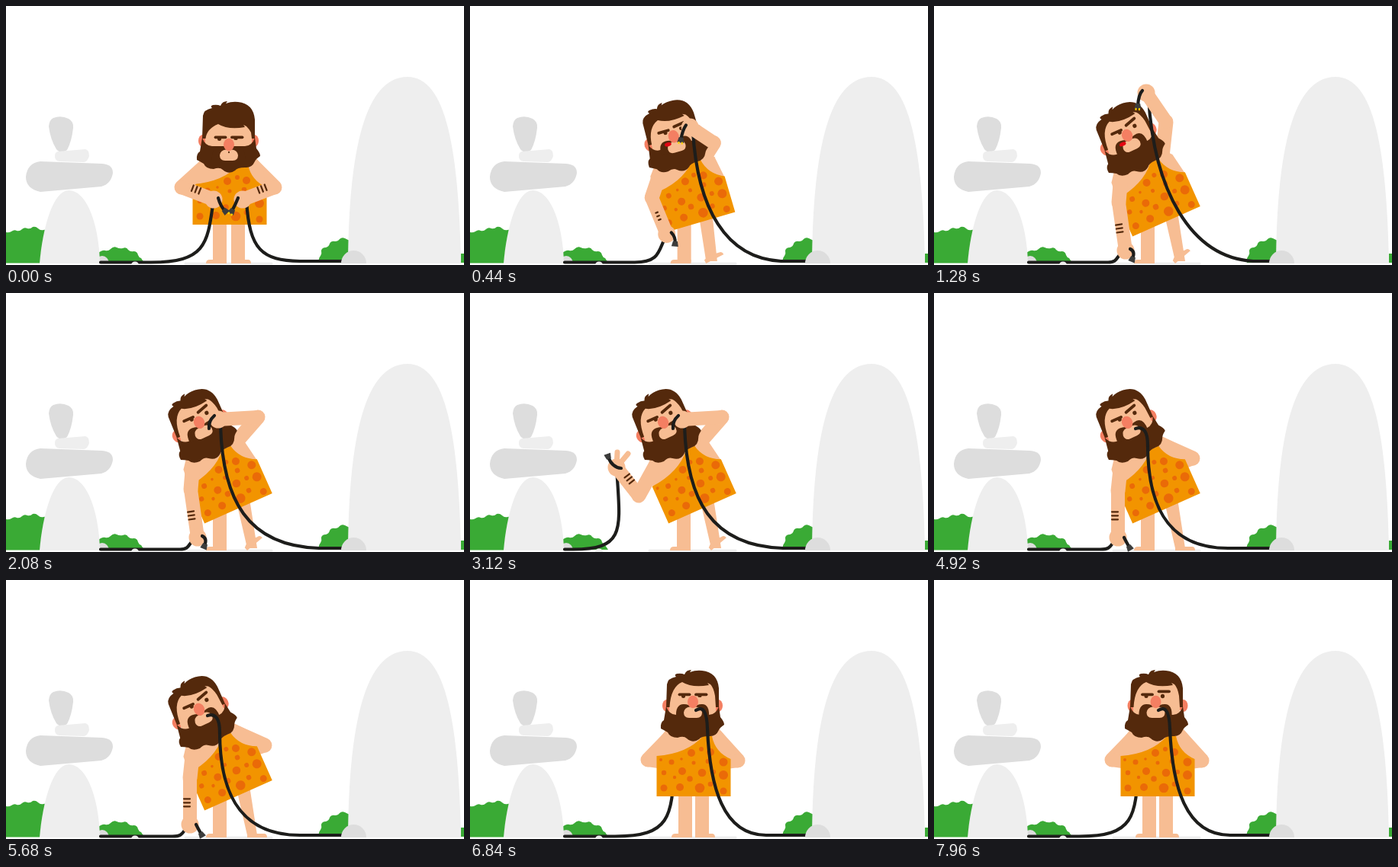
Animation, 600 px wide and 340 px high, one loop 8 s. Source, as an HTML page with a canvas:

```html
<!DOCTYPE html>
<html lang="en">
<head>
<meta charset="utf-8">
<title>Caveman with cables</title>
<style>
  html, body { margin: 0; width: 100%; height: 100%; overflow: hidden; background: #fff; }
  canvas { display: block; width: 600px; height: 340px; }
</style>
</head>
<body>
<canvas id="stage"></canvas>
<script>
const LOOP = 8000, LEAN_ANGLE = -24 * Math.PI / 180, HIP = [292.5, 284];
const SKIN = '#f7bd93', HAIR = '#54290c', CABLE = '#1d1d1b', PALE = '#eee', STONE = '#ddd',
      GREEN = '#3aaa35', ROSE = '#f47f62', TUNIC = '#f29400', SPOT = '#ea6a08', PLUG = '#3c3c3b';

const canvas = document.getElementById('stage');
const ctx = canvas.getContext('2d');
const ratio = window.devicePixelRatio || 1;
canvas.width = 600 * ratio;
canvas.height = 340 * ratio;

// ---------- drawing helpers ----------
function shape(path, color) {
  ctx.fillStyle = color;
  ctx.fill(typeof path === 'string' ? new Path2D(path) : path);
}
function stroke(path, width, color, cap = 'round') {
  ctx.lineWidth = width;
  ctx.strokeStyle = color;
  ctx.lineCap = cap;
  ctx.lineJoin = 'round';
  ctx.stroke(new Path2D(path));
}
function oval(x, y, rx, ry, color) {
  ctx.fillStyle = color;
  ctx.beginPath();
  ctx.ellipse(x, y, rx, ry, 0, 0, 7);
  ctx.fill();
}
const limb = (a, b, width) => stroke(`M${a}L${b}`, width, SKIN);
function grouped(draw) {
  ctx.save();
  draw();
  ctx.restore();
}

// ---------- poses ----------
const ground = 336.5;
const front = {
  lean: 0, look: 1, toe: 0, drop: 3, brow: 0, gaze: 0, open: 0, mouth: 0, shift: 0,
  side: -1, band: 0.42, bandR: 1, plugR: 1, fingers: 0,
  elbowL: [230, 238], handL: [272, 254], elbowR: [352, 238], handR: [310, 254],
  cableL: [264, 310, 264, ground, 190, ground],
  cableR: [315, 256, 319, 320, 335, 334, 385, 335],
  tailL: [287, 269, 281, 263, 278, 252],
  tailR: [296, 269, 300, 262, 304, 252]
};
const raised = {
  ...front, lean: 1, look: 0, toe: 1, drop: 0, brow: 1, gaze: 5, open: 1, mouth: 1,
  side: 1, band: 0.53, bandR: 0,
  elbowL: [242, 258], handL: [251, 321], elbowR: [304, 152], handR: [278, 114],
  cableL: [238, 326, 243, ground, 228, ground],
  cableR: [281, 120, 288, 240, 335, 330, 418, 335],
  tailL: [260, 332, 264, 322, 257, 319],
  tailR: [267, 131, 268, 116, 273, 111]
};
const biting = {
  ...raised, mouth: 0, plugR: 0, elbowR: [330, 163], handR: [278, 166],
  cableR: [281, 175, 284, 270, 315, 332, 410, 335],
  tailR: [266, 178, 265, 168, 273, 161]
};
const lifting = {
  ...biting, fingers: 1, elbowL: [221, 266], handL: [192, 229],
  cableL: [197, 310, 205, ground, 135, ground],
  tailL: [181, 215, 186, 229, 198, 230]
};
const hook = {
  cableR: [280, 200, 280, 270, 300, 335, 385, 335],
  tailR: [264, 178, 280, 173, 280, 200]
};
const swinging = {
  ...biting, ...hook, toe: 0.4, elbowL: [228, 262], handL: [224, 290],
  cableL: [222, 318, 222, ground, 190, ground],
  tailL: [224, 303, 232, 294, 231, 288],
  elbowR: [338, 160], handR: [362, 121]
};
const pointing = {
  ...biting, ...hook, toe: 0, bandR: 1,
  elbowL: [244, 262], handL: [256, 320], elbowR: [345, 196], handR: [388, 222],
  cableL: [243, 328, 250, ground, 232, ground],
  tailL: [261, 334, 267, 322, 262, 319]
};
const resting = {
  ...pointing, bandR: 0, elbowL: [241, 260], handL: [241, 321], elbowR: [339, 217], handR: [315, 226],
  cableL: [230, 330, 234, ground, 218, ground],
  tailL: [256, 334, 252, 327, 249, 321]
};
const standing = {
  ...front, look: 0, drop: 0, plugR: 0, bandR: 0,
  elbowL: [233, 236], handL: [268, 241], elbowR: [351, 237], handR: [320, 241],
  tailL: [280, 260, 278, 256, 274, 250],
  cableR: [311, 195, 314, 270, 331, 335, 388, 335],
  tailR: [296, 171, 310, 162, 311, 195]
};
const glancing = {
  ...standing, brow: 0.8, open: 1, shift: -1.5,
  cableR: [309, 195, 312, 270, 329, 335, 388, 335],
  tailR: [294, 171, 308, 162, 309, 195]
};

const timeline = [
  [0, front], [100, front], [700, raised], [1400, raised], [1780, biting], [2500, biting],
  [2880, lifting], [3360, lifting], [3680, swinging], [4080, pointing], [4280, pointing],
  [4800, resting], [5900, resting], [6400, standing], [7500, standing], [7660, glancing], [LOOP, glancing]
];

const blend = (a, b, k) => Array.isArray(a) ? a.map((v, i) => blend(v, b[i], k)) : a + (b - a) * k;
const ease = k => k < 0.5 ? 4 * k ** 3 : 1 - (2 - 2 * k) ** 3 / 2;

function poseAt(t) {
  const i = timeline.findIndex(key => key[0] > t);
  const [t0, a] = timeline[i - 1], [t1, b] = timeline[i];
  const k = ease((t - t0) / (t1 - t0)), pose = {};
  for (const name in a) pose[name] = blend(a[name], b[name], k);
  return pose;
}

// ---------- scenery ----------
function scenery() {
  shape(`M0 297Q4 298 7 296Q11 293 14 295Q18 296 21 293Q24 290 28 292Q32 293 35 290Q39 289 42 292
    Q45 295 49 294Q54 293 58 299V337.5H0Z`, GREEN);
  shape(`M120 325Q126 320 130 321Q134 322 137 319Q141 315 145 317Q149 319 153 318Q158 316 160 320
    Q163 323 167 322Q172 322 173 327Q174 330 177 331L181 337H120Z`, GREEN);
  shape(`M410 337Q409 331 412 328Q414 325 413 321Q414 317 419 317Q423 316 424 312Q426 308 431 309
    Q435 309 437 306Q440 303 444 305L452 309V337Z`, GREEN);
  shape('M596 325H600V337H596Z', GREEN);
  shape('M448 338C449 190 470 93 526 93C577 93 593 190 596 338Z', PALE);
  shape('M117 338A9 10 0 0 1 135 338Z', STONE);
  shape('M44 338C48 290 62 242 82 242C107 242 122 290 123 338Z', PALE);
  shape('M62 147Q72 143 82 148Q89 152 88 160Q86 178 80 189Q72 195 66 188Q58 175 56 158Q57 149 62 147Z', STONE);
  shape('M68 191L104 188Q109 189 109 197Q107 204 102 205L70 204Q64 203 64 197Q64 192 68 191Z', PALE);
  shape('M45 204L126 207Q140 208 140 219Q138 233 125 237L45 244Q26 240 26 224Q28 206 45 204Z', STONE);
  stroke('M235 338H348', 3, PALE);
}

// ---------- figure ----------
const spots = [
  [250, 236, 2], [264, 239, 3.5], [277, 235, 1.8], [290, 227, 5], [303, 222, 3], [315, 226, 5],
  [293, 240, 2.5], [254, 253, 3.2], [278, 251, 5], [268, 259, 2.2], [288, 261, 3.8], [304, 253, 5.3],
  [312, 238, 3.3], [332, 239, 5.5], [319, 252, 3], [332, 256, 6], [254, 273, 4.5], [275, 272, 5],
  [301, 273, 6.3], [315, 268, 3.3], [332, 277, 4.5]
];
const tunic = new Path2D('M244.5 231Q285 228 305 205H317Q321 226 341.5 235V284H244.5Z');

function legs(p) {
  const left = 282 - 2 * Math.max(p.lean, p.drop / 3), right = 304 + 6 * p.lean;
  const ankle = 304 + 18.5 * p.lean, half = 9 - 2.5 * p.lean;
  stroke(`M${left} 270V336`, 18, SKIN, 'butt');
  shape(`M${left + 9} 338H${left - 18}Q${left - 18} 333 ${left - 13} 333H${left + 9}Z`, SKIN);
  shape(`M${right - 9} 270H${right + 9}L${ankle + half} 335H${ankle - half}Z`, SKIN);
  grouped(() => {
    ctx.translate(ankle - half, 338);
    ctx.rotate(-0.7 * p.toe);
    shape(`M0 0V-5L8 ${-5 - 4 * p.toe}L22 -5Q26 -5 26 0Z`, SKIN);
  });
}

function body() {
  shape('M262 190H322L336 207L341 236H245L248 208Z', SKIN);
  shape(tunic, TUNIC);
  ctx.clip(tunic);
  for (const [x, y, r] of spots) oval(x, y, r, r, SPOT);
}

function head(p) {
  ctx.translate(0, 4 * p.look);
  const earY = 165 + 5 * p.look, fringe = 14 * p.look;
  oval(258 - p.shift, earY, 6, 8, ROSE);
  oval(325 - p.shift, earY, 6, 8, ROSE);
  shape('M261 132H322V186H261Z', SKIN);
  shape(`M257 167L258 137Q259 129 270 127Q267 124 271 123Q277 122 281 124Q283 118 290 118L288 121
    Q296 118 304 119Q324 121 326 142V167H322L321 ${152 + fringe / 2}Q319 ${141 + fringe} 315 ${137 + fringe}
    L311 ${135 + fringe}L313 ${138 + fringe}Q291 ${142 + fringe} 278 ${134 + fringe}
    Q263 ${140 + fringe} 261.5 167Z`, HAIR);
  shape(`M257 166Q261 177 270 177H313Q322 177 326 166L328 180Q333 186 333 190Q327 194 326 197Q322 206 313 205
    Q303 205 300 209Q292 215 284 208Q280 204 272 207Q262 207 259 200Q254 197 250 195Q249 187 254 184Z`, HAIR);
  ctx.translate(p.shift, 15 * p.look);
  shape('M270 180Q269 163 280 163Q287 163 292 168Q297 163 304 163Q314 163 313 180Z', HAIR);
  shape('M280 174Q281 167 288 166.5H296Q303 167 304 174Q304 181 297 181H287Q280 181 280 174Z', SKIN);
  if (p.look > 0.5) oval(292, 170, 1, 1.3, HAIR);
  if (p.mouth > 0.5) oval(282, 168, 4.5, 2.5, '#e30613');
  oval(292, 160, 7, 8.3, ROSE);
  shape(`M${277 + p.gaze} 151h5v1.5a2.5 2.5 0 0 1 -5 0Z`, HAIR);
  oval(301 + p.gaze, 152.5, 2.6, 1.5 + 1.2 * p.open, HAIR);
  const tilt = p.brow * p.lean * 2;
  const browY = 150.3 - 5 * p.brow;
  stroke('M274.5 150.3H287.5', 3.8, HAIR);
  stroke(`M296 ${browY + tilt}L309.5 ${browY - tilt}`, 3.8, HAIR);
}

function forearm(elbow, hand, side, band) {
  limb(elbow, hand, 18);
  oval(...hand, 11.5, 11.5, SKIN);
  if (!band) return;
  const dx = hand[0] - elbow[0], dy = hand[1] - elbow[1], len = Math.hypot(dx, dy) || 1;
  const ux = dx / len, uy = dy / len;
  for (const step of [-5, 0, 5]) {
    const at = len * band + step;
    const x = elbow[0] + ux * at, y = elbow[1] + uy * at;
    const reach = d => [x - uy * d * side, y + ux * d * side];
    stroke(`M${reach(0)}L${reach(8)}`, 2.2, HAIR);
  }
}

function tail(points, plug, prongs) {
  const [x, y, cx, cy, ex, ey] = points;
  stroke(`M${x} ${y}Q${cx} ${cy} ${ex} ${ey}`, 4.2, CABLE);
  if (plug < 0.5) return;
  grouped(() => {
    ctx.translate(x, y);
    ctx.rotate(Math.atan2(y - cy, x - cx));
    shape('M-3 -3L4 -4.5V4.5L-3 3Z', PLUG);
    if (prongs) stroke('M3 -2.2H6M3 2.2H6', 2, '#ffd500', 'butt');
  });
}

const cable = (start, curve, end) => stroke(`M${start}C${curve}L${end}`, 4.2, CABLE);

function figure(t) {
  const p = poseAt(t);
  const breath = t > 6840 ? Math.sin(Math.PI * (t - 6840) / 1120) ** 2 : 0;
  const angle = LEAN_ANGLE * p.lean;
  const hip = [HIP[0] + 11.5 * p.lean, HIP[1] - p.lean + p.drop - breath];
  const leftBehind = t > 6150, rightBehind = t > 4500;

  const upper = draw => grouped(() => {
    ctx.translate(...hip);
    ctx.rotate(angle);
    ctx.translate(-HIP[0], -HIP[1]);
    draw(p);
  });
  const shoulder = x => {
    const dx = x - HIP[0], dy = -79, c = Math.cos(angle), s = Math.sin(angle);
    return [hip[0] + dx * c - dy * s, hip[1] + dx * s + dy * c];
  };
  const leftArm = () => {
    cable(p.handL, p.cableL, [124, ground]);
    limb(shoulder(263), p.elbowL, 19);
    forearm(p.elbowL, p.handL, p.side, leftBehind ? 0 : p.band);
    if (p.fingers > 0.4) {
      const [x, y] = p.handL;
      limb(p.handL, [x + 1, y - 20 * p.fingers], 7);
      limb(p.handL, [x + 15 * p.fingers, y - 18 * p.fingers], 7);
    }
    tail(p.tailL, 1, false);
  };
  const rightForearm = () => forearm(p.elbowR, p.handR, 1, p.bandR > 0.5 ? 0.36 : 0);

  legs(p);
  if (leftBehind) leftArm();
  limb(shoulder(322), p.elbowR, 19);
  if (rightBehind) rightForearm();
  upper(body);
  if (!leftBehind) leftArm();
  upper(head);
  cable(p.cableR.slice(0, 2), p.cableR.slice(2), [442, 335]);
  if (!rightBehind) rightForearm();
  tail(p.tailR, p.plugR, true);
}

function render(t) {
  ctx.setTransform(ratio, 0, 0, ratio, 0, 0);
  ctx.clearRect(0, 0, 600, 340);
  scenery();
  figure(t);
  shape('M439 338A16.5 17 0 0 1 472 338Z', STONE);
  shape('M164 340A5 4.5 0 0 1 174 340Z', PALE);
}

const begin = performance.now();
function tick() {
  render((performance.now() - begin) % LOOP);
  requestAnimationFrame(tick);
}
tick();
</script>
</body>
</html>
```
